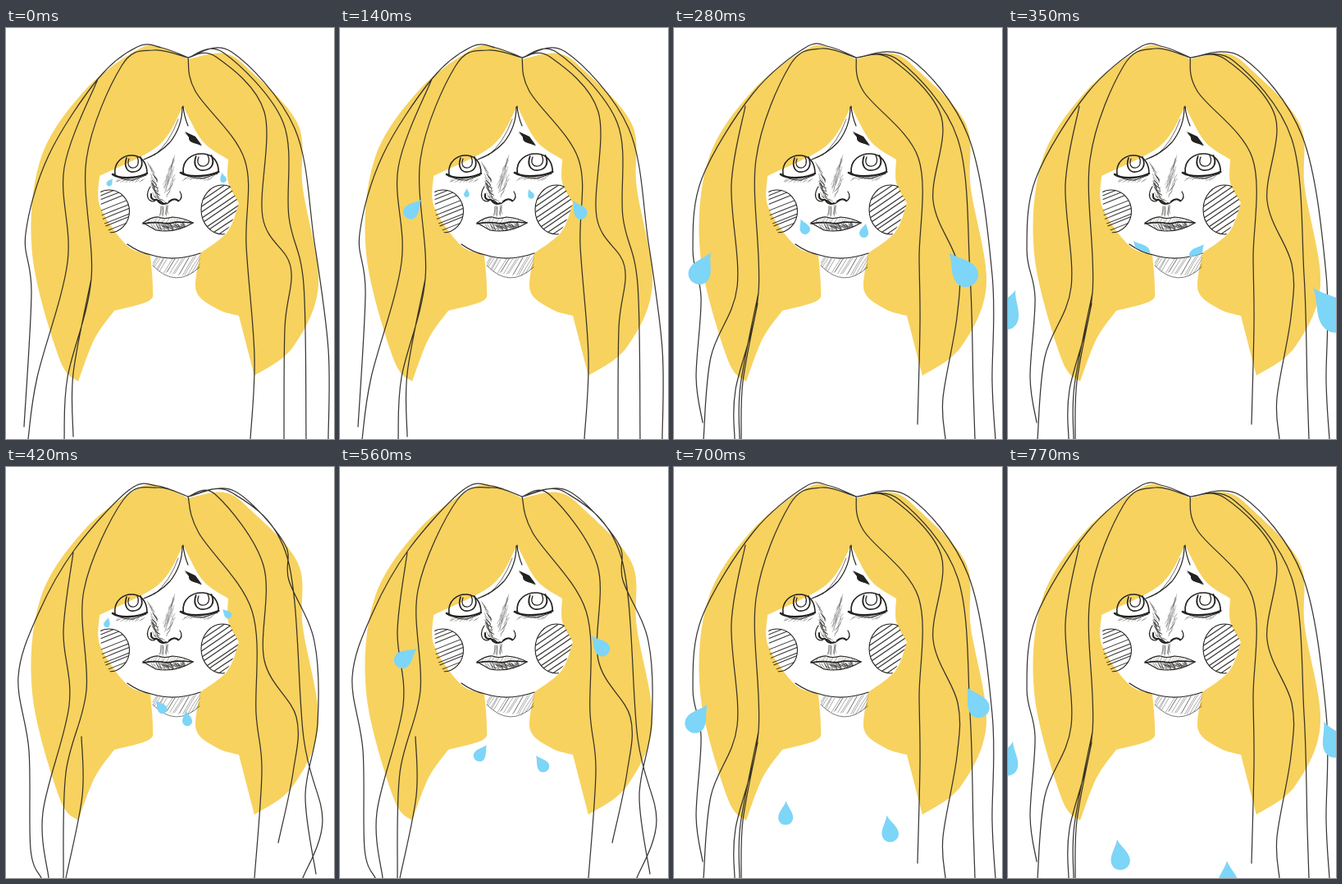
Animation of 400x500 px, one loop 0.84 s. Source, as an HTML page with a canvas:

```html
<!DOCTYPE html>
<html lang="en">
<head>
<meta charset="utf-8">
<title>Crying girl</title>
<style>
html, body { margin: 0; width: 100%; height: 100%; overflow: hidden; background: #fff; }
canvas { display: block; width: 400px; height: 500px; }
</style>
</head>
<body>
<canvas id="stage" width="400" height="500"></canvas>
<script>
const ctx = document.getElementById('stage').getContext('2d');
const STEP = 70, STEPS = 12;
const INK = '#242220', HAIR = '#f7d25f', TEAR = '#7dd5f7';
const CROWN = '222,36 ';

// Smooth curve through the points; consecutive calls meet in a corner.
function spline(path, text, first = true) {
  const pts = text.split(' ').map(p => p.split(',').map(Number));
  const at = i => pts[Math.max(0, Math.min(pts.length - 1, i))];
  if (first) path.moveTo(...pts[0]);
  for (let i = 0; i < pts.length - 1; i++) {
    const a = at(i - 1), b = at(i), c = at(i + 1), d = at(i + 2);
    path.bezierCurveTo(
      b[0] + (c[0] - a[0]) / 6, b[1] + (c[1] - a[1]) / 6,
      c[0] - (d[0] - b[0]) / 6, c[1] - (d[1] - b[1]) / 6, ...c);
  }
}

function outline(...parts) {
  const path = new Path2D();
  parts.forEach((p, i) => spline(path, p, i === 0));
  path.closePath();
  return path;
}

// Long strands start at the crown, branches anywhere.
function strands(long, branches) {
  const path = new Path2D();
  long.forEach(s => spline(path, CROWN + s));
  branches.forEach(s => spline(path, s));
  return path;
}

const hair = outline(
  '222,38 192,25 163,25 96,76 42,160 32,275 65,402 88,430',
  '88,430 108,378 132,344',
  '132,344 174,332 179,316 176,276',
  '176,276 147,264 115,218 114,180',
  '114,180 186,143 216,95',
  '216,95 240,138 271,160',
  '271,160 271,188 284,213',
  '284,213 270,248 237,274',
  '237,274 232,320 258,342 284,350',
  '284,350 303,423',
  '303,423 350,388 381,312 362,195 356,117 298,52 266,31 222,38'
);

const loose = strands([
  '190,24 160,23 112,62 52,155 24,250 31,322 22,485',
  '180,27 141,46 98,160 104,305 75,425 71,500',
  '231,77 291,160 293,265 303,400 298,500',
  '256,35 315,102 313,230 347,290 340,365 339,500',
  '265,30 338,115 345,230 363,312 366,500',
  '275,29 352,122 376,260 393,390 393,500'
], ['112,62 71,170 75,285 38,425 27,500', '104,305 82,420 82,497']);

const middle = strands([
  '190,23 160,24 96,80 34,183 23,270 33,328 27,425 35,480',
  '180,25 141,46 100,160 103,322 75,440 74,500',
  '231,77 298,158 299,280 300,360 297,482',
  '265,38 326,108 316,210 346,287 345,352 328,450 331,500',
  '275,40 346,135 361,300 365,440 367,500',
  '286,36 359,132 388,300 388,430 392,500'
], ['87,95 70,190 77,315 45,400 36,500', '103,322 81,435 80,500', '102,335 84,430 82,500']);

const wavy = strands([
  '185,23 150,28 84,100 40,177 15,255 28,345 30,465 43,500',
  '185,25 143,40 95,150 98,272 73,372 70,500',
  '235,80 300,175 305,300 312,370 303,500',
  '256,34 314,120 315,235 354,304 350,372 332,457',
  '275,31 343,110 363,330 386,430 362,500',
  '278,29 339,92 345,138 376,212 380,312 365,400 378,495'
], ['82,104 70,200 77,290 45,420 52,500', '92,328 93,400 73,500']);

const poses = [loose, middle, wavy, middle];

// Each key: step, tip x, tip y, end x, end y.
const outer = [
  [[0, 130, 183, 124, 192], [3, 75, 236, 54, 265], [5, 9, 319, -8, 366]],
  [[0, 263, 176, 266, 188], [3, 306, 238, 327, 267], [5, 372, 316, 412, 366]],
  [[6, 125, 183, 122, 195], [9, 70, 251, 43, 277], [11, 6, 334, -4, 375]],
  [[6, 264, 173, 274, 183], [9, 331, 233, 352, 262], [11, 385, 310, 405, 352]]
];
const cheek = [
  [[1, 154, 184, 154, 190], [3, 155, 211, 157, 226], [5, 153, 259, 170, 279]],
  [[1, 231, 180, 232, 187], [3, 231, 215, 234, 230], [5, 239, 263, 224, 282]]
];
const chest = [
  [[6, 183, 284, 194, 299], [8, 179, 338, 166, 357], [9, 152, 368, 145, 391], [11, 133, 453, 139, 490]],
  [[6, 219, 296, 222, 315], [8, 239, 351, 252, 370], [9, 250, 381, 260, 406], [11, 267, 479, 269, 520]]
];
const aboveChin = new Path2D('M100 100H300V240L237 274Q205 286 176 276L147 264L100 240Z');
const drop = new Path2D('M0-1C.15-.5 .62-.1 .62 .38C.62 .75 .35 1 0 1S-.62 .75-.62 .38C-.62-.1-.15-.5 0-1Z');

// Accelerating fall: a parabola through three keys.
function fall(keys, step, i) {
  return keys.reduce((sum, k) => sum + keys.reduce(
    (w, o) => o === k ? w : w * (step - o[0]) / (k[0] - o[0]), k[i]), 0);
}

function drawTear(keys, step) {
  if (step < keys[0][0] || step > keys[keys.length - 1][0]) return;
  const near = step > keys[1][0] ? keys.slice(-3) : keys.slice(0, 3);
  const [x1, y1, x2, y2] = [1, 2, 3, 4].map(i => fall(near, step, i));
  const r = Math.hypot(x2 - x1, y2 - y1) / 2;
  ctx.save();
  ctx.translate((x1 + x2) / 2, (y1 + y2) / 2);
  ctx.rotate(Math.atan2(x1 - x2, y2 - y1));
  ctx.scale(r, r);
  ctx.fillStyle = TEAR;
  ctx.fill(drop);
  ctx.restore();
}

let seed;
const rand = () => (seed = (seed * 16807) % 2147483647) / 2147483647 - .5;

function ink(d, width = 1, alpha = 1) {
  ctx.globalAlpha = alpha;
  ctx.lineWidth = width;
  ctx.stroke(typeof d === 'string' ? new Path2D(d) : d);
  ctx.globalAlpha = 1;
}

// Loose pencil strokes along a line, each leaning by (dx, dy).
function hatch(x1, y1, x2, y2, count, dx, dy, width = .7, alpha = .55, wobble = 3) {
  const path = new Path2D();
  for (let i = 0; i < count; i++) {
    const f = i / (count - 1);
    const x = x1 + (x2 - x1) * f + rand() * wobble;
    const y = y1 + (y2 - y1) * f + rand() * wobble;
    path.moveTo(x, y);
    path.quadraticCurveTo(x + dx / 2 + rand() * wobble, y + dy / 2, x + dx + rand() * wobble, y + dy);
  }
  ink(path, width, alpha);
}

function clipped(path, draw) {
  ctx.save();
  ctx.clip(path);
  draw();
  ctx.restore();
}

function disc(x, y, rx, ry) {
  const path = new Path2D();
  path.ellipse(x, y, rx, ry, 0, 0, 2 * Math.PI);
  return path;
}

const face = new Path2D('M114 150H271V188L284 213Q270 262 237 274Q205 286 176 276Q122 262 116 225Z');
const leftCheek = disc(126, 223, 24.5, 26);
const rightCheek = disc(264, 221, 26, 30);
const neck = new Path2D('M178 277Q205 286 237 275L236 291Q207 318 179 289Z');
const lips = new Path2D('M167 237Q179 229 186 230Q193 233 203 230Q217 231 228 237Q207 250 183 246Z');

function drawEye(dx, dy, scale) {
  ctx.save();
  ctx.translate(dx, dy);
  ctx.scale(scale, 1);
  ink('M133 178C131 163 143 154 155 155C167 156 172 166 172 177', 1.5);
  ink('M130 178Q137 183 152 182Q164 181 172 177', 2.5);
  ink('M132 177Q139 186 155 185L171 179');
  ink('M147 158C143 170 149 176 156 175C165 174 168 166 164 157', 1.7);
  ink('M150 159C147 167 151 171 156 170C161 169 163 163 160 157', 1.2);
  hatch(137, 184, 168, 183, 14, -4, 3, .6);
  ctx.restore();
}

function drawNose() {
  hatch(174, 162, 179, 200, 13, 5, 8);
  hatch(179, 178, 181, 200, 13, 5, 6, 1, .7, 5);
  hatch(207, 155, 196, 188, 17, -5, 14, .6, .45, 5);
  hatch(206, 180, 199, 198, 8, -4, 7);
  ink('M176 193C170 202 172 211 180 211Q185 207 190 212Q195 216 200 211Q206 206 210 211Q217 206 212 199', 1.2);
  ink('M177 202Q176 210 184 209M185 210Q190 216 195 213M199 211Q205 206 210 210', 2);
  hatch(180, 204, 190, 210, 8, 4, 2, .9);
  hatch(189, 218, 198, 216, 9, -1, 11);
}

function drawMouth() {
  ink(lips, 1.1);
  ink('M167 238Q180 236 190 237Q197 239 207 236Q218 236 228 237', 1.7);
  clipped(lips, () => {
    hatch(172, 230, 224, 231, 26, -5, 8, .6, .4);
    hatch(178, 238, 218, 237, 26, 5, 9, .8, .65);
    hatch(186, 241, 213, 239, 14, 7, 3, 1);
  });
}

function drawFace() {
  seed = 4711;
  ink('M215 96Q215 120 200 139Q187 153 168 160M216 95Q217 107 222 119', 1.2);
  ink('M210 111Q200 139 181 155', .8, .8);

  ctx.fillStyle = INK;
  ctx.fill(new Path2D('M218 126L231 132L239 143L229 140Q222 138 223 133Z'));
  hatch(220, 128, 232, 139, 7, 6, 5);

  drawEye(0, 0, 1);
  drawEye(70, -2, 1.1);
  drawNose();
  drawMouth();

  clipped(face, () => {
    ink(leftCheek, 1.1);
    ink(rightCheek, 1.1);
    clipped(leftCheek, () => hatch(105, 208, 105, 267, 11, 48, -19, 1.1, .85));
    clipped(rightCheek, () => hatch(231, 207, 238, 281, 12, 56, -38, 1.2, .9));
  });

  ink('M148 263Q162 273 177 276Q205 285 237 274', 1.2);
  ink('M179 289Q207 318 236 291', .8, .75);
  clipped(neck, () => hatch(174, 294, 239, 304, 23, 15, -25));
}

function draw(step) {
  ctx.fillStyle = '#fff';
  ctx.fillRect(0, 0, 400, 500);
  ctx.strokeStyle = INK;
  ctx.lineCap = ctx.lineJoin = 'round';
  ctx.fillStyle = HAIR;
  ctx.fill(hair);
  drawFace();
  ink(poses[Math.floor(step / 3)], 1.25, .9);
  clipped(aboveChin, () => cheek.forEach(t => drawTear(t, step)));
  [...outer, ...chest].forEach(t => drawTear(t, step));
}

let shown = -1;
const start = performance.now();
function tick() {
  const step = Math.floor((performance.now() - start) / STEP) % STEPS;
  if (step !== shown) draw(shown = step);
  requestAnimationFrame(tick);
}
tick();
</script>
</body>
</html>
```
